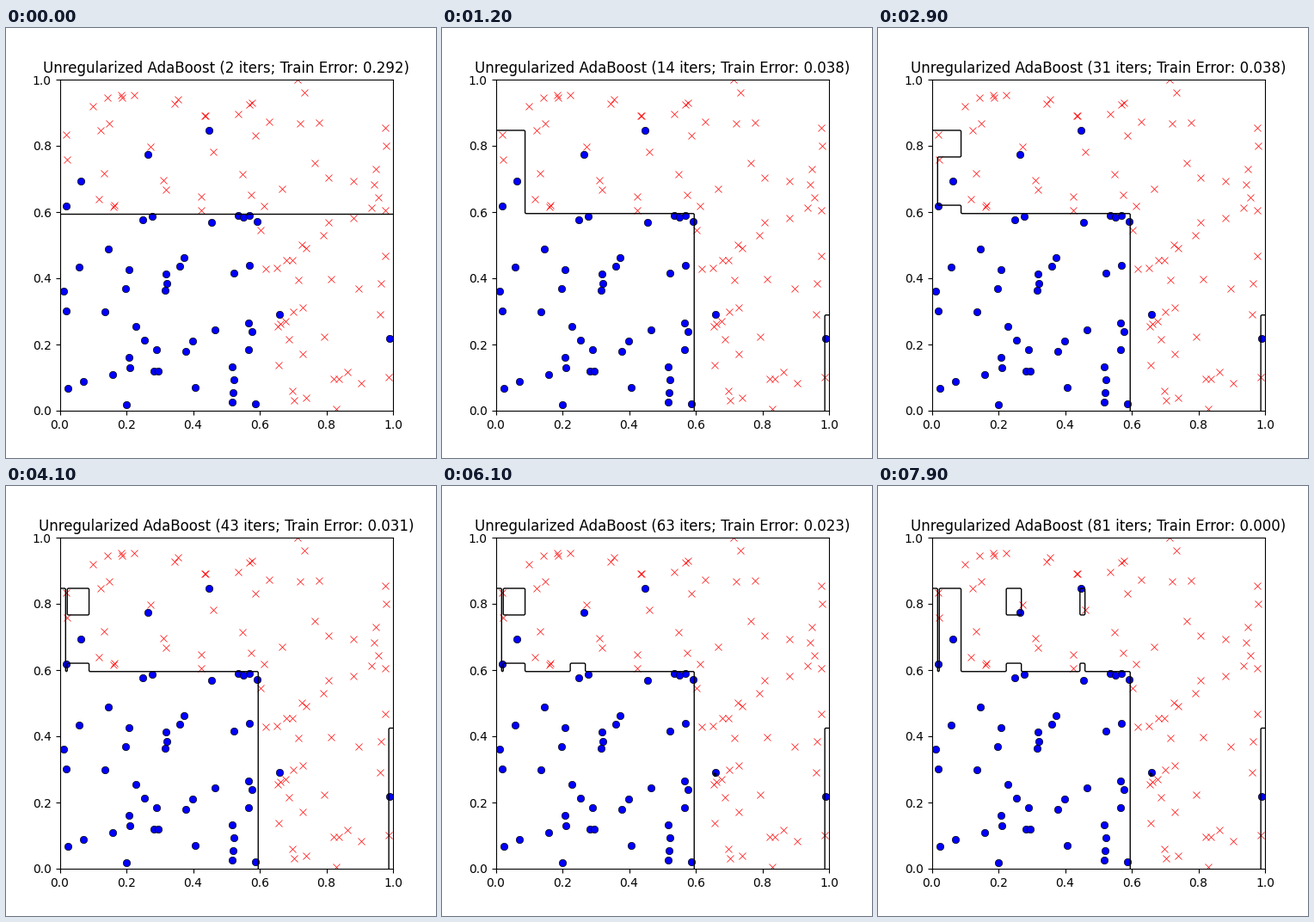
A matplotlib script that plays this animation: 500x500 px, repeating every 8000 ms.

```python
import numpy as np
import matplotlib.pyplot as plt
from matplotlib.animation import FuncAnimation

plt.rcParams["font.family"] = "DejaVu Sans"

SAMPLES, GRID = 130, 200
FIRST_ITER, LAST_ITER = 2, 81

# Samples in the lower left square are blue, and so are a few outliers.
np.random.seed(0)
samples = np.random.rand(SAMPLES, 2)
is_blue = (samples < 0.6).all(axis=1)
for spot in [(0.06, 0.69), (0.019, 0.618), (0.264, 0.774),
             (0.448, 0.847), (0.659, 0.290), (0.990, 0.218)]:
    is_blue[np.hypot(*(samples - spot).T).argmin()] = True
labels = np.where(is_blue, 1, -1)

# A stump cuts one axis halfway between two neighbouring samples.
ordered = np.sort(samples, axis=0)
cuts = (ordered[1:] + ordered[:-1]) / 2
stumps = [(dim, cut) for dim in (0, 1) for cut in cuts[:, dim]]


def vote(stump, coords):
    dim, cut = stump
    return np.where(coords[..., dim] < cut, 1, -1)


axis = np.linspace(0, 1, GRID)
mesh = np.dstack(np.meshgrid(axis, axis))
votes = np.array([vote(stump, samples) for stump in stumps])


def boost(rounds):
    """Return the decision region and training error after each round."""
    weights = np.full(SAMPLES, 1 / SAMPLES)
    sample_score, mesh_score = np.zeros(SAMPLES), np.zeros((GRID, GRID))
    history = []
    for _ in range(rounds):
        edges = votes @ (weights * labels)
        best = np.abs(edges).round(12).argmax()
        alpha = np.arctanh(edges[best])  # negative when the sides swap
        weights *= np.exp(-alpha * labels * votes[best])
        weights /= weights.sum()
        sample_score += alpha * votes[best]
        mesh_score += alpha * vote(stumps[best], mesh)
        error = np.mean((sample_score > 0) != is_blue)
        history.append((np.where(mesh_score > 0, 1, -1), error))
    return history


history = boost(LAST_ITER)

fig, ax = plt.subplots(figsize=(5, 5), dpi=100)
ax.plot(*samples[~is_blue].T, "rx", markersize=6, markeredgewidth=0.5)
ax.plot(*samples[is_blue].T, "bo", markersize=6, markeredgecolor="black",
        markeredgewidth=0.5)
outlines = []


def draw(frame):
    iters = FIRST_ITER + frame
    region, error = history[iters - 1]
    while outlines:
        outlines.pop().remove()
    outlines.append(ax.contour(axis, axis, region, levels=[0],
                               colors="black", linewidths=1))
    ax.set(xlim=(0, 1), ylim=(0, 1))
    ax.set_title(f"Unregularized AdaBoost ({iters} iters; "
                 f"Train Error: {error:.3f})", fontsize=12)


animation = FuncAnimation(fig, draw, frames=LAST_ITER - FIRST_ITER + 1,
                          init_func=lambda: draw(0), interval=100,
                          repeat=True, repeat_delay=0, blit=False)
plt.show()
```
